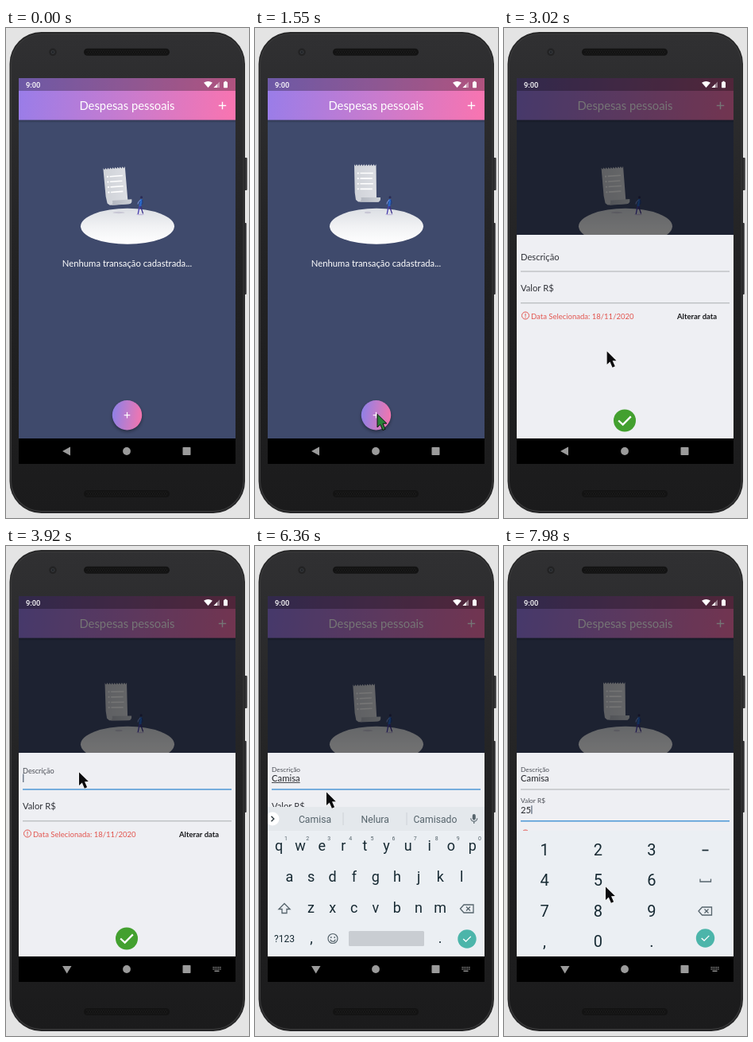
Write an HTML page with a canvas that moves like this. It is 306x616 px and loops after 8 s.

```html
<!DOCTYPE html>
<html lang="pt-BR">
<head>
<meta charset="utf-8">
<title>Despesas pessoais</title>
<style>
  html, body { margin: 0; width: 100%; height: 100%; overflow: hidden; background: #e4e4e4; }
  canvas { display: block; width: 306px; height: 616px; }
</style>
</head>
<body>
<canvas id="stage"></canvas>
<script>
const W = 306, H = 616, LOOP = 8000;
const canvas = document.getElementById('stage');
const ctx = canvas.getContext('2d');
const dpr = window.devicePixelRatio || 1;
canvas.width = W * dpr;
canvas.height = H * dpr;

const APP = 'Lato, "Open Sans", sans-serif';
const SYS = 'Roboto, Inter, sans-serif';
const TAU = Math.PI * 2;
const SCREEN = { x: 16, y: 63, w: 273, bottom: 516 };

// Event times in ms
const OPEN = 2475, FOCUS = 3800, KEYS_UP = 4020, SWITCH = 6860;
const NAME_KEYS = [4500, 4850, 5100, 5350, 5620, 5830];
const VALUE_KEYS = [7620, 7850];
const HINTS = [
  [],
  ['C', 'Can', 'I'],
  ['Ca', 'Can', 'Car'],
  ['Cam', 'Came', 'Camera'],
  ['Cami', 'Camisa', 'Camisado'],
  ['Camis', 'Camisa', 'Camisado'],
  ['Camisa', 'Nelura', 'Camisado']
];
// Pointer path: time, x, y
const PATH = [
  [30, 310, 622], [250, 296, 600], [850, 259, 541], [1500, 154, 485],
  [2700, 154, 485], [3450, 92, 284], [6100, 92, 284], [6360, 90, 309],
  [6560, 86, 322], [6950, 86, 322], [7500, 128, 428], [8000, 128, 428]
];

const clamp = v => Math.max(0, Math.min(1, v));
const mix = (a, b, k) => a + (b - a) * k;
const smooth = k => k * k * (3 - 2 * k);
const typed = (times, t) => times.filter(at => at <= t).length;

function rect(x, y, w, h, fill) {
  ctx.fillStyle = fill;
  ctx.fillRect(x, y, w, h);
}
function round(x, y, w, h, r, fill) {
  ctx.beginPath();
  ctx.roundRect(x, y, w, h, r);
  ctx.fillStyle = fill;
  ctx.fill();
}
function oval(x, y, rx, ry, fill) {
  ctx.beginPath();
  ctx.ellipse(x, y, rx, ry, 0, 0, TAU);
  ctx.fillStyle = fill;
  ctx.fill();
}
const dot = (x, y, r, fill) => oval(x, y, r, r, fill);
function trace(points, close) {
  ctx.beginPath();
  points.forEach(([x, y]) => ctx.lineTo(x, y));
  if (close) ctx.closePath();
}
function poly(points, fill) {
  trace(points, true);
  ctx.fillStyle = fill;
  ctx.fill();
}
function line(points, color, width = 1, close = false) {
  trace(points, close);
  ctx.strokeStyle = color;
  ctx.lineWidth = width;
  ctx.stroke();
}
function ring(x, y, r, color, width = 1) {
  ctx.beginPath();
  ctx.arc(x, y, r, 0, TAU);
  ctx.strokeStyle = color;
  ctx.lineWidth = width;
  ctx.stroke();
}
function text(str, x, y, size, color, family = APP, align = 'left', weight = 400) {
  ctx.font = `${weight} ${size}px ${family}`;
  ctx.textAlign = align;
  ctx.fillStyle = color;
  ctx.fillText(str, x, y);
}
function ramp(x0, y0, x1, y1, ...colors) {
  const g = ctx.createLinearGradient(x0, y0, x1, y1);
  colors.forEach((c, i) => g.addColorStop(i / (colors.length - 1), c));
  return g;
}
function plus(x, y, r, width) {
  line([[x - r, y], [x + r, y]], '#fff', width);
  line([[x, y - r], [x, y + r]], '#fff', width);
}
function tick(x, y, s, width) {
  line([[x - s, y], [x - s * 0.3, y + s * 0.65], [x + s, y - s * 0.65]], '#fff', width);
}
function clipped(x, y, w, h, draw) {
  ctx.save();
  ctx.beginPath();
  ctx.rect(x, y, w, h);
  ctx.clip();
  draw();
  ctx.restore();
}

function speaker(y) {
  round(98, y, 108, 9, 4.5, '#131313');
  for (let row = 0; row < 3; row++)
    for (let i = 0; i < 34; i++)
      rect(101.5 + i * 3 + (row % 2) * 1.5, y + 2 + row * 2.2, 1, 1, '#252525');
}
function phone() {
  rect(0, 0, W, H, '#e4e4e4');
  round(299, 163, 4.7, 41, 1, '#343436');
  round(299, 245, 3.8, 90, 1, '#343436');
  round(4.5, 5, 296.5, 605, 40, '#262627');
  round(6, 7, 293.5, 601, 38.5, '#3a3a3b');
  round(7, 8, 291.5, 599, 37.5, ramp(0, 8, 0, 607, '#303032', '#222223', '#1b1b1c'));
  speaker(25.7);
  speaker(581);
  dot(59, 30.3, 4.8, '#232324');
  dot(59, 30.3, 2.4, '#34373b');
  dot(59, 30.3, 1.1, '#1a1c20');
}

function header() {
  rect(16, 63, 273, 453, '#3f4a6c');
  rect(16, 115.5, 273, 4, ramp(0, 115.5, 0, 119.5, 'rgba(0,0,0,.25)', 'rgba(0,0,0,0)'));
  rect(16, 63, 273, 52.6, ramp(16, 72, 289, 107, '#997de9', '#c87bce', '#f974b0'));
  rect(16, 63, 273, 16, 'rgba(0,0,0,.29)');
  text('Despesas pessoais', 152.5, 103, 14.8, '#fff', APP, 'center');
  plus(272.5, 97.5, 4.7, 1.4);
}
function statusBar() {
  text('9:00', 25, 74.5, 9.3, '#fff', SYS, 'left', 500);
  ctx.beginPath();
  ctx.moveTo(254.5, 75);
  ctx.lineTo(249, 68.8);
  ctx.quadraticCurveTo(254.5, 65, 260, 68.8);
  ctx.fillStyle = '#fff';
  ctx.fill();
  poly([[261.5, 75], [269, 75], [269, 67.5]], 'rgba(255,255,255,.4)');
  poly([[261.5, 75], [266, 75], [266, 70.5]], '#fff');
  round(274, 67.8, 5, 7.4, 0.7, '#fff');
  rect(275.5, 66.8, 2, 1.2, '#fff');
}

function note(tilt) {
  ctx.save();
  ctx.translate(141 + tilt, 218 + 5 * tilt);
  ctx.rotate(-tilt * Math.PI / 30);
  ctx.translate(-141, -218);
  const edge = [];
  for (let i = 0; i <= 18; i++) edge.push([125 + i * 1.53, i % 2 ? 173.5 : 171.3]);
  poly([...edge, [153, 214], [156, 218.5], [130, 218.5], [127, 216], [125.7, 207]],
    ramp(125, 0, 153, 0, '#cfd2d8', '#dcdee3'));
  ctx.beginPath();
  ctx.moveTo(132, 218.8);
  ctx.quadraticCurveTo(134.5, 216.5, 133.5, 213);
  ctx.lineTo(158, 213);
  ctx.quadraticCurveTo(158.5, 218.8, 154, 218.8);
  ctx.closePath();
  ctx.fillStyle = ramp(133, 0, 158, 0, '#b4b8c1', '#ccd0d6');
  ctx.fill();
  for (let i = 0; i < 4; i++) {
    const y = 182.5 + i * 6.6;
    dot(129.8, y, 1.1, '#fff');
    line([[132.5, y], [148.8 - (i % 2), y]], '#fff', 1.6);
  }
  ctx.restore();
}
function walker(tilt) {
  const lean = tilt * 0.8;
  oval(169, 234.5, 5, 0.8, 'rgba(120,90,190,.3)');
  line([[168.5, 223], [167.4, 228], [166.2, 234]], '#4a3fb0', 1.3);
  line([[169.3, 223], [170.8, 228], [172.6, 233.4]], '#3a2f8c', 1.3);
  poly([[168.5 + lean, 215], [171.2 + lean, 215.2], [170.4, 224.3], [167.4, 224]], '#2a66c4');
  line([[168.8 + lean, 216], [166.6, 219], [166, 221.5]], '#7f9be6', 1);
  line([[171 + lean, 216], [172.2, 219.5], [171, 222]], '#1d3d86', 1);
  dot(170 + lean, 212.8, 1.5, '#2b2b55');
}
function artwork(t) {
  const tilt = (1 - Math.cos((t - 1490) / 2180 * TAU)) / 2;
  oval(153, 249.3, 59, 22.5, ramp(0, 227, 0, 272, '#dcdfe4', '#f1f2f4', '#ffffff'));
  oval(142, 232, 4 + 5 * tilt, 1.2, 'rgba(150,140,175,.32)');
  note(tilt);
  walker(tilt);
}
function addButton() {
  ctx.save();
  ctx.shadowColor = 'rgba(0,0,0,.4)';
  ctx.shadowBlur = 4 * dpr;
  ctx.shadowOffsetY = 2 * dpr;
  dot(152.5, 486.7, 18.7, ramp(134, 484, 171, 489, '#8f80e6', '#c07ccb', '#f375ae'));
  ctx.restore();
  plus(152.5, 486.7, 3.8, 1.2);
}

function field(label, y, float, active, value, caret, composing) {
  const size = mix(11.2, 8.3, float);
  text(label, 21, mix(y + 30.6, y + 22.5, float), size, float ? '#4a4d55' : '#303238');
  const ruleY = y + 45;
  line([[21, ruleY], [284, ruleY]], active ? '#4c97d6' : '#a3a5a9', active ? 1.5 : 0.9);
  text(value, 21, y + 34.8, 11.3, '#25272c');
  const end = 21 + ctx.measureText(value).width;
  if (composing && value) line([[21, y + 36.5], [end, y + 36.5]], '#33353a', 0.9);
  if (caret) line([[end + 0.8, y + 25.5], [end + 0.8, y + 36]], '#46566a', 1.1);
}
function sheet(t, top) {
  const nameCount = typed(NAME_KEYS, t), valueCount = typed(VALUE_KEYS, t);
  const onValue = t >= SWITCH - 120;
  const onName = t >= FOCUS && !onValue;
  const since = Math.max(FOCUS, ...[...NAME_KEYS, SWITCH - 120, ...VALUE_KEYS].filter(at => at <= t));
  const blink = (t - since) % 1000 < 500;
  const lift = start => smooth(clamp((t - start) / 190));
  rect(16, top - 1, 273, 517 - top, '#eeeff3');
  field('Descrição', top, lift(FOCUS), onName, 'Camisa'.slice(0, nameCount), onName && blink, onName);
  field('Valor R$', top + 39.8, lift(SWITCH - 120), onValue, '25'.slice(0, valueCount), onValue && blink, false);
  const y = top + 101;
  ring(27, y - 0.5, 4.5, '#e2554f', 1);
  line([[27, y - 3], [27, y + 0.4]], '#e2554f', 1);
  dot(27, y + 1.7, 0.6, '#e2554f');
  text('Data Selecionada: 18/11/2020', 34, y + 3.5, 9.5, '#e2554f');
  text('Alterar data', 218, y + 3.5, 9.5, '#17181b', APP, 'left', 700);
  dot(152, top + 232.5, 14, '#43a02f');
  tick(152, top + 232.5, 7.8, 2.3);
}

const KEY = '#172a33', DIM = '#56646c';
const key = (s, x, y, size = 18) => text(s, x, y + size * 0.35, size, KEY, SYS, 'center');
function erase(x, y) {
  line([[x - 8.5, y], [x - 4, y - 5], [x + 8, y - 5], [x + 8, y + 5], [x - 4, y + 5]], DIM, 1.3, true);
  line([[x - 1, y - 2.5], [x + 4, y + 2.5]], DIM, 1.2);
  line([[x - 1, y + 2.5], [x + 4, y - 2.5]], DIM, 1.2);
}
function done(x, y) {
  dot(x, y, 11.7, '#4cb5aa');
  tick(x, y, 4.8, 1.4);
}
function letters(t) {
  rect(16, 328, 273, 188, '#ebeff3');
  rect(16, 328, 273, 30, '#e4e8ec');
  dot(22, 343, 8.5, '#fff');
  line([[20.5, 339.8], [23.8, 343], [20.5, 346.2]], '#2d383e', 1.4);
  [111, 191].forEach(x => line([[x, 335], [x, 351]], '#cbd0d5', 0.9));
  HINTS[typed(NAME_KEYS, t)].forEach((s, i) =>
    text(s, 75.5 + i * 75.7, 347.5, 12.2, DIM, SYS, 'center'));
  round(273.8, 337, 4, 7.5, 2, DIM);
  ctx.beginPath();
  ctx.arc(275.8, 342.3, 4, 0, Math.PI);
  ctx.strokeStyle = DIM;
  ctx.lineWidth = 1.1;
  ctx.stroke();
  line([[275.8, 346.3], [275.8, 349]], DIM, 1.2);

  [['qwertyuiop', 30, 377], ['asdfghjkl', 43.5, 416], ['zxcvbnm', 70.5, 455]].forEach(([row, x, y]) =>
    [...row].forEach((c, i) => key(c, x + i * 27.1, y)));
  [...'1234567890'].forEach((c, i) => text(c, 39 + i * 27.1, 370, 7, DIM, SYS, 'center'));
  line([[37, 449.5], [44, 456.5], [40, 456.5], [40, 461.5], [34, 461.5], [34, 456.5], [30, 456.5]], DIM, 1.3, true);
  erase(267, 456);
  key('?123', 37, 493.5, 12);
  key(',', 71, 493);
  ring(98, 493.5, 6, DIM, 1.2);
  dot(95.8, 492, 0.9, DIM);
  dot(100.2, 492, 0.9, DIM);
  ctx.beginPath();
  ctx.arc(98, 494, 3.2, 0.2, Math.PI - 0.2);
  ctx.stroke();
  round(118, 484, 95, 19, 1.5, '#c9cdd2');
  key('.', 233, 493);
  done(267, 494);
}
function digits() {
  rect(16, 358, 273, 158, '#ebeff3');
  ['123', '456', '789', ',0.'].forEach((row, r) =>
    [...row].forEach((c, i) => key(c, 51 + i * 67.4, 382 + r * 38.4, 20)));
  line([[249.5, 382.5], [257.5, 382.5]], KEY, 1.7);
  line([[247, 418.5], [247, 422], [260.5, 422], [260.5, 418.5]], DIM, 1.3);
  erase(253.5, 459);
  done(253.5, 493);
}

function navBar(t) {
  const grey = '#9b9b9b', keyboard = t >= FOCUS + 40;
  rect(16, 516, 273, 32, '#000');
  poly(keyboard ? [[71, 528], [82.5, 528], [76.7, 537.5]] : [[71, 532], [81, 526.5], [81, 537.5]], grey);
  dot(152, 532, 4.9, grey);
  round(222.5, 527, 10, 10, 0.8, grey);
  if (!keyboard) return;
  for (let r = 0; r < 2; r++)
    for (let i = 0; i < 5; i++) rect(260.5 + i * 2.2, 529 + r * 2.3, 1.3, 1.3, grey);
  rect(262.5, 533.7, 6, 1.3, grey);
}

function pointer(t) {
  if (t < PATH[0][0]) return;
  const i = PATH.findIndex(p => p[0] > t);
  const [t0, x0, y0] = PATH[i - 1], [t1, x1, y1] = PATH[i];
  const k = (t - t0) / (t1 - t0);
  const ease = t < 850 || (t > 6100 && t < 6560) ? k : smooth(k);
  ctx.save();
  ctx.translate(mix(x0, x1, ease), mix(y0, y1, ease) + 0.5);
  const shape = [[0, 0], [0, 16.5], [3.8, 13], [6.9, 20.2], [10.1, 18.8], [7, 11.8], [11.8, 11.6]];
  ctx.lineJoin = 'round';
  if (t < OPEN) {
    poly(shape, '#2a8038');
    line(shape, '#101510', 1, true);
  } else {
    line(shape, '#f4f4f4', 1.3, true);
    poly(shape, '#0b0b0d');
  }
  ctx.restore();
}

function draw(t) {
  ctx.setTransform(dpr, 0, 0, dpr, 0, 0);
  phone();
  clipped(SCREEN.x, SCREEN.y, SCREEN.w, SCREEN.bottom - SCREEN.y, () => {
    header();
    artwork(t);
    text('Nenhuma transação cadastrada...', 152.5, 300.4, 11.3, '#fff', APP, 'center');
    addButton();
    if (t >= OPEN) {
      const left = Math.pow(1 - clamp((t - 2490) / 220), 3);
      rect(16, 63, 273, 453, `rgba(0,0,0,${mix(0.54, 0.45, left)})`);
      sheet(t, 261 + 42 * left);
    }
    statusBar();
    if (t >= SWITCH) digits();
    else if (t >= KEYS_UP) {
      ctx.translate(0, 188 * Math.pow(1 - clamp((t - KEYS_UP) / 100), 2));
      letters(t);
    }
  });
  navBar(t);
  pointer(t);
}

const start = performance.now();
function tickFrame() {
  draw((performance.now() - start) % LOOP);
  requestAnimationFrame(tickFrame);
}
tickFrame();
</script>
</body>
</html>
```
